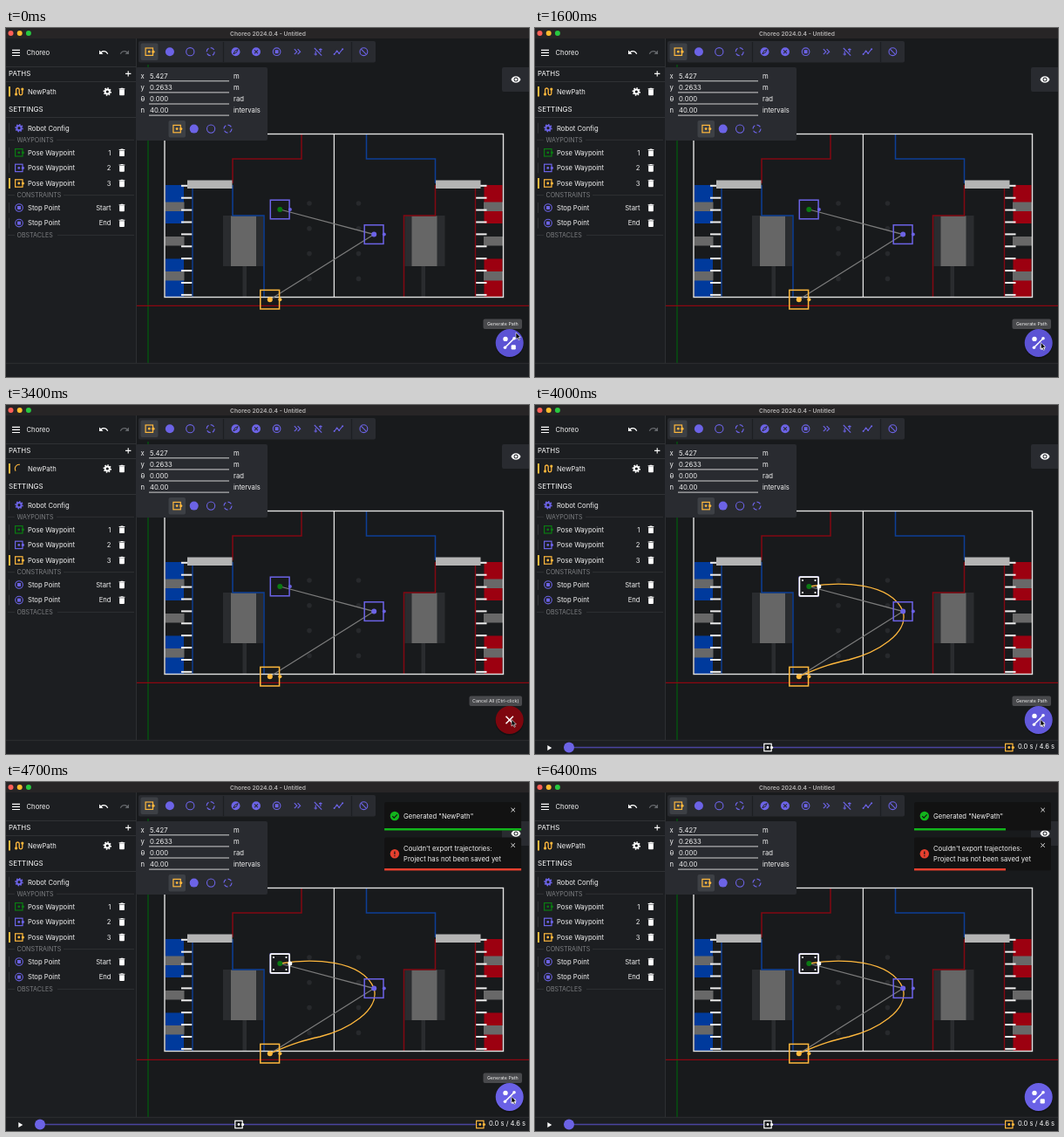
Recreate the animation shown at these times as an HTML page. Size 600x400 px, loop 6500 ms.

```html
<!DOCTYPE html>
<html lang="en">
<head>
<meta charset="utf-8">
<title>Choreo</title>
<style>
html, body { margin: 0; width: 100%; height: 100%; overflow: hidden; background: #181a1c; }
svg { display: block; width: 600px; height: 400px; font: 7.7px Inter, "Open Sans", sans-serif; }
text { white-space: pre; }
</style>
</head>
<body>
<svg id="stage" viewBox="0 0 600 400" xmlns="http://www.w3.org/2000/svg"></svg>
<script>
const LOOP = 6500, STEP = 100;
const START = 2310, DONE = 3900, TOAST_IN = 3945, TOAST_SET = 4745, TOAST_LIFE = 5000;
const V = '#6c63e6', Y = '#ffb83d', W = '#fff', G = '#0a7a12', BLUE = '#003a9c', RED = '#9c0010';
const CANVAS = '#181a1c', SIDE = '#1c1e21', PANEL = '#292b30', PICKED = '#3d4045';

// Markup helpers
const rect = (x, y, w, h, fill, extra = '') =>
  `<rect x="${x}" y="${y}" width="${w}" height="${h}" fill="${fill}" ${extra}/>`;
const dot = (x, y, r, fill, extra = '') => `<circle cx="${x}" cy="${y}" r="${r}" fill="${fill}" ${extra}/>`;
const ring = (x, y, r, c, w = 1.1, extra = '') =>
  dot(x, y, r, 'none', `stroke="${c}" stroke-width="${w}" ${extra}`);
const line = (d, c, w = 1, extra = '') =>
  `<path d="${d}" fill="none" stroke="${c}" stroke-width="${w}" ${extra}/>`;
const text = (x, y, s, fill = '#f2f2f2', extra = '') => `<text x="${x}" y="${y}" fill="${fill}" ${extra}>${s}</text>`;
const group = (id, body, extra = '') => `<g id="${id}" ${extra}>${body}</g>`;
const at = (x, y, body) => `<g transform="translate(${x} ${y})">${body}</g>`;
const glyph = (x, y, size, d, fill, flip = 1) =>
  `<path transform="translate(${x} ${y}) scale(${flip * size / 24} ${size / 24}) translate(-12 -12)" d="${d}" fill="${fill}" fill-rule="evenodd"/>`;

// Icons
const TRASH = 'M6 19c0 1.1.9 2 2 2h8c1.1 0 2-.9 2-2V7H6v12zM19 4h-3.5l-1-1h-5l-1 1H5v2h14V4z';
const UNDO = 'M12.5 8c-2.65 0-5.05.99-6.9 2.6L2 7v9h9l-3.62-3.62c1.39-1.16 3.16-1.88 5.12-1.88 3.54 0 6.55 2.31 7.6 5.5l2.37-.78C21.08 11.03 17.15 8 12.5 8z';
const EYE = 'M12 4.5C7 4.5 2.7 7.6 1 12c1.7 4.4 6 7.5 11 7.5s9.3-3.1 11-7.5c-1.7-4.4-6-7.5-11-7.5zm0 12.5a5 5 0 110-10 5 5 0 010 10zm0-8a3 3 0 100 6 3 3 0 000-6z';
const trash = y => glyph(133, y, 11.5, TRASH, W);
const gear = (x, y, c) => ring(x, y, 2.6, c, 2) + ring(x, y, 4, c, 1.5, 'pathLength="16" stroke-dasharray="1 1"');
const pose = (x, y, c) => rect(x - 4.4, y - 4.2, 8.4, 8.4, 'none', `stroke="${c}" stroke-width="1.2"`) +
  dot(x - .2, y, 1.4, c) + dot(x + 4.4, y, 1.6, c);
const stop = (x, y) => ring(x, y, 4.3, V) + rect(x - 2, y - 2, 4, 4, V);
const dashed = (x, y) => ring(x, y, 4.5, V, 1.2, 'pathLength="12" stroke-dasharray="2 1"');
const cross = (x, y, r, c, w) => line(`M${x - r} ${y - r}l${2 * r} ${2 * r}m0 ${-2 * r}l${-2 * r} ${2 * r}`, c, w);
const kinds = (x, y, gap) => pose(x, y, Y) + dot(x + gap, y, 5, V) + ring(x + 2 * gap, y, 4.6, V) + dashed(x + 3 * gap, y);

function axes() {
  return rect(0, 0, 600, 400, CANVAS) + line('M163 42V384', '#00600c', 1.2) + line('M149 318.3H600', '#8c0710', 1.2);
}

// One half of the field; the other is its mirror with swapped colours
function half(near, far, nearLine, farLine) {
  let s = rect(249, 215, 46, 58, '#2a2c2f') + rect(271.5, 273, 4.5, 35, '#2a2c2f') + rect(258, 215.5, 29, 57.5, '#666');
  for (let i = 0; i < 4; i++) s += dot(348, 201 + i * 28.8, 2.8, '#27292c');
  s += rect(183, 180, 21, 44, near) + rect(183, 264.5, 21, 43.5, near);
  for (const y of [199.5, 239, 279]) s += rect(182.5, y, 22, 10.5, '#686868');
  s += line('M214 180V308', nearLine, 1.4);
  for (let i = 0; i < 10; i++) s += line(`M201 ${180.8 + i * 13.9}H213.300`, '#eee', 2);
  s += line('M339 121V150H260V178', farLine, 1.5) + line('M260 180V215H296V308', nearLine, 1.5);
  return s + rect(208, 174.5, 51.5, 9.5, '#b4b4b4');
}

function waypoint(x, y, c, mid = c) {
  return rect(x - 11, y - 10.8, 21.8, 21.6, 'none', `stroke="${c}" stroke-width="1.5"`) +
    dot(x, y, 3, mid) + dot(x + 11.6, y, 2, c);
}

function field() {
  const robot = rect(303.4, 197.2, 21.8, 21.6, 'none', `stroke="${W}" stroke-width="1.7" rx="1"`) +
    [307, 321.5].map(x => dot(x, 201, 1.1, W) + dot(x, 215, 1.1, W)).join('') + dot(325.8, 208, 2.5, W);
  const blueLine = '#0d3f96', redLine = '#830812';
  return half(BLUE, RED, blueLine, redLine) +
    `<g transform="translate(752.5 0) scale(-1 1)">${half(RED, BLUE, redLine, blueLine)}</g>` +
    rect(182, 121.5, 388.5, 187, 'none', 'stroke="#e2e2e2" stroke-width="1.4"') + line('M376.4 121V308', '#e2e2e2', 1.3) +
    line('M314.3 208L422.2 236.6L302.8 311.2', '#7c7c7c', 1.2) +
    group('route', line('M314.300 208C350 202 408 203 422.200 236.600C429 262 392 284 360 292C344 295.500 330 299 302.800 311.200', Y, 1.3)) +
    waypoint(314.3, 208, V, G) + waypoint(422.2, 236.6, V) + waypoint(302.8, 311.2, Y) + group('robot', robot);
}

function sidebar() {
  let s = rect(0, 12, 149, 372, SIDE) + line('M149.500 12V384', '#2d2f32') + line('M0 44.500H149M0 61.500H149M0 102.500H149', '#2f3134');
  s += line('M7 25.300H16M7 28.400H16M7 31.500H16', W, 1.2) + text(23.5, 31.3, 'Choreo');
  s += glyph(112, 28, 12, UNDO, W) + glyph(136, 28, 12, UNDO, '#63666a', -1);
  s += text(3, 55.3, 'PATHS', W, 'font-size="7.9"') + line('M137 52.400H143.400M140.200 49.200V55.600', W, 1.1);
  s += rect(3, 67, 2, 11.5, Y) + text(25, 75.8, 'NewPath') + gear(116.3, 73, W) + trash(73);
  s += group('pathIcon', at(15, 73, line('M-3.400 2V-2.200a1.800 1.800 0 013.600 0V2a1.800 1.800 0 003.600 0V-2', Y, 1.3) +
    dot(-3.4, 2.9, 1.6, Y) + dot(3.8, -2.9, 1.6, Y)));
  s += `<circle id="spin" r="4.7" fill="none" stroke="${Y}" stroke-width="1.1" pathLength="126.9"/>`;

  const mark = (y, c) => rect(3, y - 6, c ? 2 : 1, 12, c || '#333639');
  s += text(3, 96.3, 'SETTINGS', W, 'font-size="8"') + mark(114.7) + gear(15, 114.7, V) + text(25, 117.6, 'Robot Config');
  const heads = [[128.3, 'WAYPOINTS', 58], [191.6, 'CONSTRAINTS', 66], [237.4, 'OBSTACLES', 59]];
  for (const [y, name, x] of heads)
    s += line(`M2 ${y}H10M${x} ${y}H147`, '#333538', .8) + text(12.5, y + 2.6, name, '#7d7f82', 'font-size="7.1"');
  const row = (y, icon, name, tag, c) => mark(y, c) + icon + text(25, y + 2.8, name) +
    text(120.5, y + 2.8, tag, '#f2f2f2', 'text-anchor="end"') + trash(y);
  [G, V, Y].forEach((c, i) => {
    const y = 142.8 + i * 17.6;
    s += row(y, pose(15, y, c), 'Pose Waypoint', i + 1, c === Y && Y);
  });
  ['Start', 'End'].forEach((tag, i) => { const y = 206 + i * 17.6; s += row(y, stop(15, y), 'Stop Point', tag); });
  return s;
}

function topBar() {
  let s = rect(152, 15, 272, 24.5, PANEL, 'rx="2"') + line('M249.500 16V39M396.500 16V39', '#1d1f22', 1.2);
  s += rect(154.5, 17.5, 20, 19.5, PICKED, 'rx="2"') + kinds(164.5, 27.2, 23.4);
  s += at(263.5, 27.2, dot(0, 0, 5, V) + line('M-2.600 2.600L-.9 -.9L2.600 -2.600L.9 .9Z', PANEL, 1));
  s += dot(287, 27.2, 5, V) + cross(287, 27.2, 1.9, PANEL, 1.1) + stop(310.6, 27.2);
  s += line('M330.800 24.200l3 3l-3 3m3.800 -6l3 3l-3 3', V, 1.2);
  s += line('M353.800 23L362.200 31.700M355.200 26.500V31.500M353.500 30H357M360.900 28V23.300M359 24.600H362.600', V, 1.1);
  s += line('M376.600 30l3 -3.400l2.600 2.400l4 -4.800', V, 1.1) +
    [[376.6, 30], [379.6, 26.6], [382.2, 29], [386.2, 24.2]].map(p => dot(...p, 1, V)).join('');
  return s + ring(410.4, 27.2, 4.4, V) + line('M407.300 24.100l6.200 6.200', V, 1.1);
}

function panels() {
  let s = rect(149, 45, 151, 84, PANEL, 'rx="2"') + rect(569, 45, 33, 28, PANEL, 'rx="2"') + glyph(585, 59, 12, EYE, W);
  const rows = [['x', '5.427', 'm'], ['y', '0.2633', 'm'], ['θ', '0.000', 'rad'], ['n', '40.00', 'intervals']];
  rows.forEach(([k, v, u], i) => {
    const y = 58 + i * 13.1;
    s += text(154.5, y, k) + text(165, y, v) + text(261, y, u) + line(`M164 ${y + 2.8}H256`, '#e4e4e4', .9);
  });
  return s + rect(186.5, 106, 19.5, 19.5, PICKED, 'rx="2"') + kinds(196.3, 115.6, 19.4);
}

function footer() {
  const slot = (x, c) => rect(x - 5.2, 387.5, 10.5, 10, SIDE) + pose(x, 392.5, c);
  const bar = `<path d="M14.300 390v6l5 -3z" fill="${W}"/>` + line('M39 392.500H544', '#4a449f', 1.4) + dot(39, 392.5, 6, V) +
    slot(267.2, W) + slot(544, Y) + text(554, 394.3, '0.0 s / 4.6 s', W, 'font-size="7.6"');
  return rect(0, 384, 600, 16, SIDE) + line('M0 384.300H600', '#2f3134', .9) + group('player', bar);
}

function actions() {
  const tip = (id, x, label) => group(id, rect(x, 333.5, 592 - x, 11.5, '#48494c', 'rx="2"') +
    text((x + 592) / 2, 341.2, label, '#eee', 'font-size="5.3" text-anchor="middle"'));
  const solve = line('M583 355.700L572.500 366.300', W, 1.5) + dot(583, 355.7, 1.8, W) + dot(572.5, 366.3, 1.8, W) +
    dot(573, 356.4, 2.7, W) + rect(579.6, 363.2, 5.2, 5.2, W, 'rx="1.2"');
  return tip('tipRun', 547.5, 'Generate Path') + tip('tipStop', 531.5, 'Cancel All (Ctrl-click)') +
    dot(577.7, 362.6, 16.2, '#000', 'opacity=".3"') + dot(577.7, 361, 16, V, 'id="fab"') +
    group('solve', solve) + group('cancel', cross(577.7, 361, 4.2, W, 1.5));
}

function toasts() {
  const card = (y, h, c, mark, lines, id) => rect(435, y, 157, h, '#121212', 'rx="2"') +
    dot(446.8, y + h / 2 - .2, 5.2, c) + mark + cross(582.6, y + 9, 2.2, '#e8e8e8', 1) +
    lines.map((l, i) => text(457, y + h / 2 + 2.7 + (i - (lines.length - 1) / 2) * 12, l)).join('') +
    rect(435, y + h - 2.5, 157, 2.5, c, `id="${id}"`);
  return card(23, 32.5, '#12b41c', line('M444.200 39.200l1.900 1.900l3.600 -3.800', '#121212', 1.2), ['Generated "NewPath"'], 'bar1') +
    card(63.5, 38, '#e5402f', line('M446.800 79.400v3.600m0 1v1.300', '#121212', 1.2),
      ["Couldn't export trajectories:", 'Project has not been saved yet'], 'bar2');
}

function titleBar() {
  return rect(0, 0, 600, 12, '#272526') + ['#ff5f57', '#febc2e', '#28c840'].map((c, i) => dot(5.5 + i * 10.2, 6, 3, c)).join('') +
    text(300.5, 8.5, 'Choreo 2024.0.4 - Untitled', '#b5b3b3', 'font-size="6.7" font-weight="600" text-anchor="middle"');
}

const stage = document.getElementById('stage');
stage.innerHTML = axes() + field() + sidebar() + topBar() + panels() + footer() + actions() +
  group('toasts', toasts()) + titleBar() +
  group('cursor', `<path d="M0 0V7.600L1.800 6L3.100 8.800L4.300 8.200L3 5.500H5.400Z" fill="#000" stroke="#fff" stroke-width=".6"/>`);

const el = {};
stage.querySelectorAll('[id]').forEach(n => el[n.id] = n);

// Motion
const clamp = x => Math.max(0, Math.min(1, x));
const smooth = x => x * x * (3 - 2 * x);
const easeOut = x => 1 - (1 - x) ** 3;
const show = (on, ...ids) => ids.forEach(id => el[id].style.display = on ? '' : 'none');
const mix = (a, b, k) => `rgb(${a.map((v, i) => Math.round(v + (b[i] - v) * k))})`;

function track(steps, t, ease) {
  let i = 0;
  while (i < steps.length - 2 && t >= steps[i + 1][0]) i++;
  const [t0, ...a] = steps[i], [t1, ...b] = steps[i + 1];
  const k = ease(clamp((t - t0) / (t1 - t0)));
  return a.map((v, j) => v + (b[j] - v) * k);
}

const SLIDE = [[0, 3000], [.6, -25], [.75, 10], [.9, -5], [1, 0]];
const POINTER = [[0, 585, 349], [500, 585, 349], [1300, 580.5, 360.5], [2300, 580, 360.5], [5700, 580, 360.5], [6200, 615, 340]];
const HOVER = [92, 83, 212], IDLE = [106, 97, 230], STOP = [126, 6, 14], PRESSED = [84, 18, 28];

function spin(t) {
  const p = t / 1400 % 1;
  const len = p < .5 ? 1 + 99 * smooth(p * 2) : 100;
  const off = p < .5 ? 15 * smooth(p * 2) : 15 + 110 * smooth(p * 2 - 1);
  el.spin.setAttribute('stroke-dasharray', `${len} 200`);
  el.spin.setAttribute('stroke-dashoffset', -off);
  el.spin.setAttribute('transform', `translate(15 73) rotate(${p * 360})`);
}

function render(t) {
  const busy = t >= START && t < DONE, done = t >= DONE;
  show(busy, 'spin', 'cancel', 'tipStop');
  show(!busy, 'pathIcon', 'solve', 'tipRun');
  show(done, 'route', 'robot', 'player');
  show(t >= TOAST_IN, 'toasts');
  if (busy) spin(t - START);

  const fade = from => clamp((t - from) / 250);
  el.fab.setAttribute('fill', busy ? mix(PRESSED, STOP, fade(START)) : mix(HOVER, IDLE, fade(DONE)));
  el.tipRun.setAttribute('opacity', 1 - fade(5950));

  const [x, y] = track(POINTER, t, smooth);
  el.cursor.setAttribute('transform', `translate(${x} ${y})`);

  const p = clamp((t - TOAST_IN) / (TOAST_SET - TOAST_IN));
  el.toasts.setAttribute('transform', `translate(${track(SLIDE, p, easeOut)[0]} 0)`);
  const width = 157 * (1 - clamp((t - TOAST_SET) / TOAST_LIFE));
  el.bar1.setAttribute('width', width);
  el.bar2.setAttribute('width', width);
}

const begin = performance.now();
function tick(now) {
  const t = Math.max(0, now - begin) % LOOP;
  render(Math.floor(t / STEP) * STEP);
  requestAnimationFrame(tick);
}
render(0);
requestAnimationFrame(tick);
</script>
</body>
</html>
```
